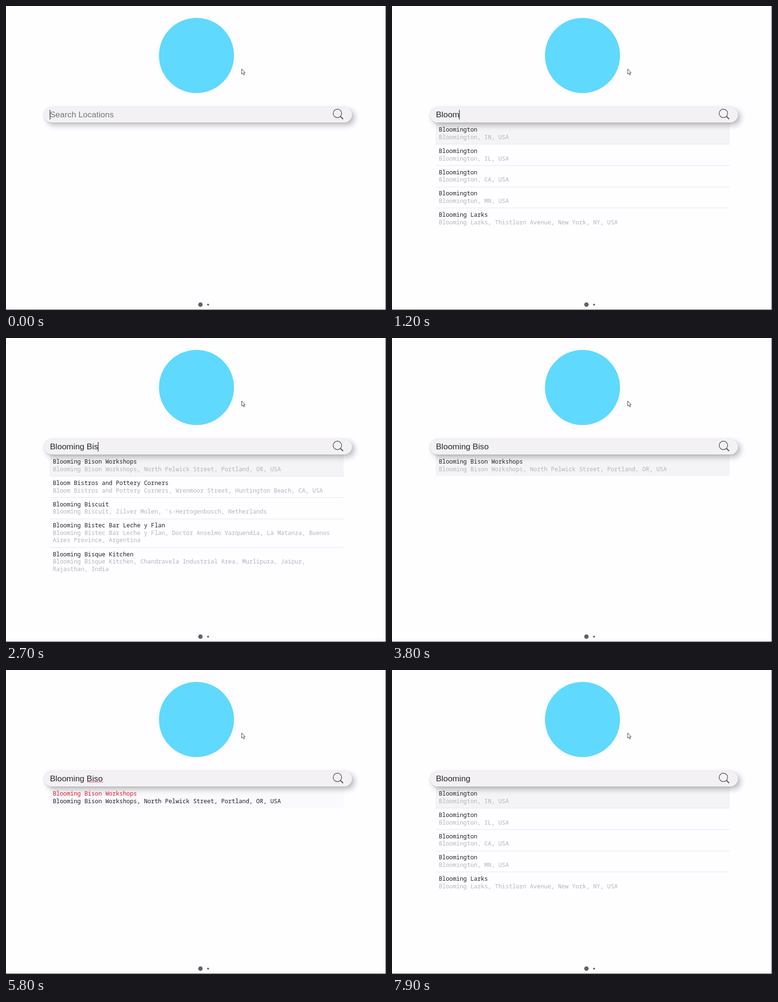
These frames come from a looping animation (800 px wide and 639 px high, 8000 ms). An HTML page:

```html
<!DOCTYPE html>
<html lang="en">
<head>
<meta charset="utf-8">
<title>Location search</title>
<style>
html, body { margin: 0; width: 100%; height: 100%; overflow: hidden; background: #fefdff; }
svg { display: block; }
text { white-space: pre; }
.list { font: 12.32px "Noto Sans Mono", monospace; }
.name { fill: #202124; }
.place { fill: #b5b4b7; }
.input { font: 17.4px "Liberation Sans", Arial, sans-serif; }
</style>
</head>
<body>
<svg id="stage" width="800" height="639" viewBox="0 0 800 639">
  <defs>
    <filter id="lift" filterUnits="userSpaceOnUse" x="40" y="180" width="740" height="110" color-interpolation-filters="sRGB">
      <feDropShadow dx="6" dy="6" stdDeviation="6" flood-color="#000" flood-opacity=".24"/>
    </filter>
    <filter id="edge" filterUnits="userSpaceOnUse" x="40" y="180" width="740" height="110" color-interpolation-filters="sRGB">
      <feDropShadow dx="0" dy="0.5" stdDeviation="1" flood-color="#000" flood-opacity=".2"/>
    </filter>
  </defs>
  <rect width="800" height="639" fill="#fefdff"/>
  <circle cx="401" cy="104" r="79" fill="#5fd9fd"/>
  <g id="lists" class="list"></g>
  <g filter="url(#lift)">
    <rect x="79.5" y="212" width="649" height="33" rx="16.5" fill="#f3f1f4" filter="url(#edge)"/>
  </g>
  <g class="input">
    <text id="hint" x="92.5" y="234" fill="#757575">Search Locations</text>
    <text id="query" x="92.5" y="234" fill="#27272a"></text>
  </g>
  <path id="squiggle" fill="none" stroke="#e0344a" stroke-width="1"/>
  <rect id="caret" y="218.5" width="1.2" height="20" fill="#222"/>
  <g fill="none" stroke="#555">
    <circle cx="697.7" cy="225.7" r="8.9" stroke-width="1.4"/>
    <path d="M704 232L709.7 237.6" stroke-width="2.2"/>
  </g>
  <path d="M496.1 132.4v10.6l2.4-2.1 1.9 4 1.8-.8-1.8-3.9h3.1z" fill="#fff" stroke="#3c3c40" stroke-width="1"/>
  <circle cx="409.3" cy="627.8" r="4.7" fill="#626164"/>
  <circle cx="425.4" cy="627.8" r="2" fill="#626164"/>
  <path d="M799.5 0V639M0 638.5H800" stroke="#454448" fill="none"/>
</svg>
<script>
const LOOP = 8000;
const $ = id => document.getElementById(id);

function add(parent, tag, attrs, content = "") {
  const el = document.createElementNS("http://www.w3.org/2000/svg", tag);
  for (const key in attrs) el.setAttribute(key, attrs[key]);
  el.textContent = content;
  parent.appendChild(el);
  return el;
}

// Each entry is a name and its address; "|" marks a line break.
const towns = [
  ...["IN", "IL", "CA", "MN"].map(state => ["Bloomington", state + ", USA"]),
  ["Blooming Larks", "Thistlorn Avenue, New York, NY, USA"]
];
const shops = [
  ["Blooming Bison Workshops", "North Pelwick Street, Portland, OR, USA"],
  ["Bloom Bistros and Pottery Corners", "Wrenmoor Street, Huntington Beach, CA, USA"],
  ["Blooming Biscuit", "Zilver Molen, 's-Hertogenbosch, Netherlands"],
  ["Blooming Bistec Bar Leche y Flan", "Doctor Anselmo Varquendia, La Matanza, Buenos|Aires Province, Argentina"],
  ["Blooming Bisque Kitchen", "Chandravela Industrial Area, Murlipura, Jaipur,|Rajasthan, India"]
];

function buildList(entries) {
  const group = add($("lists"), "g", {});
  let top = 245.6;
  entries.forEach(([name, address], i) => {
    const lines = (name + ", " + address).split("|");
    const height = 44.65 + 15.6 * (lines.length - 1);
    if (i === 0) add(group, "rect", { x: 92, y: 245, width: 619, height: 45, fill: "#f4f3f5" });
    add(group, "text", { x: 98.4, y: top + 18.7, class: "name" }, name);
    lines.forEach((line, n) =>
      add(group, "text", { x: 98.4, y: top + 34.3 + 15.6 * n, class: "place" }, line));
    top += height;
    if (i < entries.length - 1)
      add(group, "rect", { x: 92, y: Math.round(top), width: 619, height: 1, fill: "#e6e5e8" });
  });
  return group;
}

const lists = [buildList(towns), buildList(shops), buildList(shops.slice(0, 1))];
const [rowBack, rowName, rowPlace] = lists[2].children;

// Timelines: [start time, value]
const phrase = "Blooming Biso";
const typed = [[0, 0], [200, 1], [300, 2], [500, 3], [600, 4], [800, 5], [1400, 6], [1500, 7],
  [1700, 8], [2000, 9], [2200, 10], [2300, 11], [2500, 12], [3000, 13],
  [7100, 12], [7300, 11], [7400, 10], [7500, 9], [7600, 8]];
const shown = [[0, -1], [600, 0], [2500, 1], [3100, 2], [7600, 0]];
const caretOn = [[0, 1], [3800, 0], [4100, 1], [4500, 0], [4900, 1], [5300, 0],
  [6200, 1], [6600, 0], [7000, 1], [7900, 0]];
const misspelt = [[0, 0], [4100, 1], [7100, 0]];

function at(track, t) {
  let value = track[0][1];
  for (const [start, v] of track) if (t >= start) value = v;
  return value;
}

const show = (el, on) => { el.style.display = on ? "" : "none"; };
const mix = (a, b, k) => "rgb(" + a.map((v, i) => Math.round(v + (b[i] - v) * k)) + ")";

let squiggle = "M170.5 236.5";
for (let i = 1; i <= 17; i++) squiggle += "L" + (170.5 + i * 2) + " " + (i % 2 ? 234.8 : 236.5);
$("squiggle").setAttribute("d", squiggle);

function draw(t) {
  const count = at(typed, t);
  const query = $("query");
  query.textContent = phrase.slice(0, count);
  show($("hint"), !count);
  $("caret").setAttribute("x", 92 + (count ? query.getComputedTextLength() : 0));
  show($("caret"), at(caretOn, t));
  show($("squiggle"), at(misspelt, t));

  const current = at(shown, t);
  lists.forEach((list, i) => show(list, i === current));

  const k = Math.min(1, Math.max(0, (t - 5300) / 400));
  rowBack.style.fill = mix([244, 243, 245], [250, 249, 251], k);
  rowName.style.fill = mix([32, 33, 36], [214, 26, 56], k);
  rowPlace.style.fill = mix([181, 180, 183], [32, 33, 36], k);
}

const begin = performance.now();
function tick() {
  draw((performance.now() - begin) % LOOP);
  requestAnimationFrame(tick);
}
tick();
</script>
</body>
</html>
```
